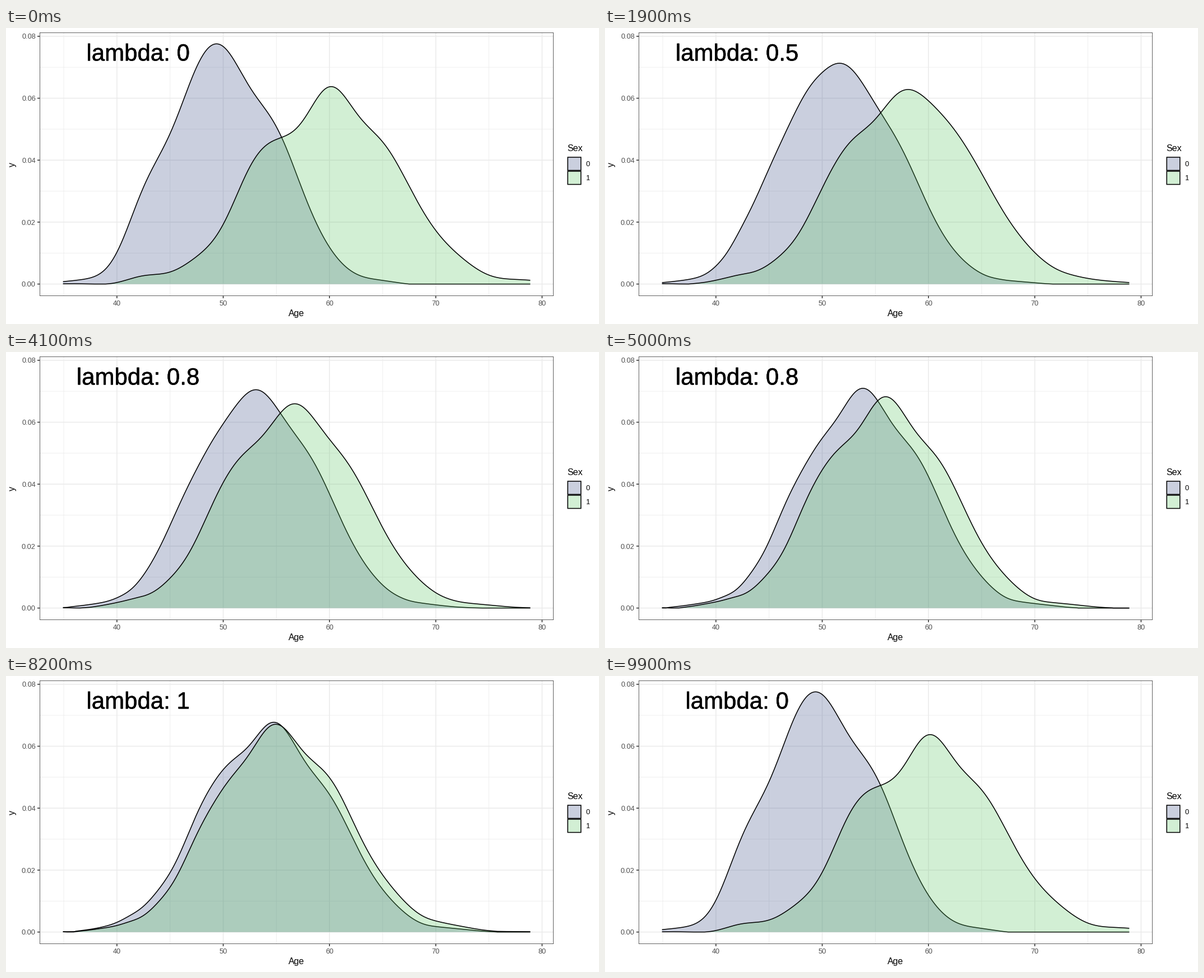
Write a matplotlib script that moves like this. It is 1058x529 px and loops after 10 s.

```python
import math

import matplotlib.pyplot as plt
import numpy as np
from matplotlib.animation import FuncAnimation
from matplotlib.patches import Polygon, Rectangle
from matplotlib.patheffects import withStroke

WIDTH, HEIGHT, DPI = 1058, 529, 64
PT = 72 / DPI  # points per pixel
LEFT, RIGHT, TOP, BOTTOM = 60, 977, 8, 479
BASE_SIZE, TICK_SIZE, LABEL_SIZE = 16, 12.8, 42
LINE = 1.55
FILLS = ["#3B4F88", "#5CC463"]
ALPHA = 0.27
AGE_TICKS, AGE_MIDDLES = range(40, 81, 10), range(35, 80, 10)
DENSITY_TICKS, DENSITY_MIDDLES = np.arange(5) * 0.02, np.arange(1, 8, 2) * 0.01

LAMBDAS = [0, 0.5, 0.8, 1]
REST, CYCLE = 5, 25  # first transition frame and frames per state
FRAMES = CYCLE * len(LAMBDAS)

# Heights (1e-4) of the two age densities, every 2.5 years from a first age.
STEP = 2.5
GROUPS = [
    (35, [8, 20, 103, 313, 486, 701, 767, 636, 508, 300, 119, 33, 12, 0]),
    (37.5, [0, 5, 27, 39, 89, 193, 378, 467, 528, 637, 554, 459, 316, 173,
            84, 29, 15, 9]),
]

plt.rcParams["font.family"] = "Liberation Sans"


def px_x(age):
    return 197.9 + (age - 40) * 18.963


def px_y(density):
    return 457.6 - density * 5535


def kernel_curve(first, heights, at):
    """Sum of Gaussian kernels that passes through the given heights."""
    knots = first + STEP * np.arange(len(heights))

    def kernels(ages):
        return np.exp(-0.5 * ((ages[:, None] - knots) / 1.9) ** 2)

    weights = np.linalg.solve(kernels(knots), np.array(heights) * 1e-4)
    return np.maximum(kernels(at) @ weights, 0) + 1e-7


def cumulative(density):
    total = np.cumsum(density)
    return (total - total[0]) / (total[-1] - total[0])


def repair(own, other, amount):
    """Move each quantile of one group towards the mean of both groups."""
    partner = np.interp(cumulative(own), cumulative(other), support)
    moved = support + amount / 2 * (partner - support)
    return np.interp(ages, moved, own / np.gradient(moved, support))


support = np.linspace(30, 84, 2001)
ages = np.linspace(34.927, 78.89, 441)
xs = px_x(ages)
first_group, second_group = (kernel_curve(*g, support) for g in GROUPS)
curves = np.array([[repair(first_group, second_group, amount),
                    repair(second_group, first_group, amount)]
                   for amount in LAMBDAS])

fig = plt.figure(figsize=(WIDTH / DPI, HEIGHT / DPI), dpi=DPI,
                 facecolor="white")
ax = fig.add_axes([0, 0, 1, 1])
ax.set_xlim(0, WIDTH)
ax.set_ylim(HEIGHT, 0)
ax.axis("off")


def line(x, y, color, width, zorder):
    return ax.plot(x, y, color=color, lw=width * PT, zorder=zorder,
                   solid_capstyle="butt", solid_joinstyle="round",
                   snap=False)[0]


def frame_box(x, y, w, h, color, width, zorder):
    ax.add_patch(Rectangle((x, y), w, h, fill=False, ec=color,
                           lw=width * PT, zorder=zorder, snap=False))


def text(x, y, string, size=TICK_SIZE, color="black", ha="center", **kw):
    return ax.text(x, y, string, fontsize=size * PT, color=color, ha=ha,
                   va="baseline", zorder=9, **kw)


def draw_grid():
    for width, columns, rows in ((LINE / 2, AGE_MIDDLES, DENSITY_MIDDLES),
                                 (LINE, AGE_TICKS, DENSITY_TICKS)):
        for age in columns:
            line([px_x(age)] * 2, [TOP, BOTTOM], "#EBEBEB", width, 1)
        for density in rows:
            line([LEFT, RIGHT], [px_y(density)] * 2, "#EBEBEB", width, 1)


def draw_axes():
    thin = LINE / 2
    frame_box(LEFT + thin / 2, TOP + thin / 2, RIGHT - LEFT - thin,
              BOTTOM - TOP - thin, "#333333", thin, 8)
    for age in AGE_TICKS:
        x = px_x(age)
        line([x, x], [BOTTOM, BOTTOM + 4], "#333333", LINE, 8)
        text(x, 495.8, str(age), color="#4D4D4D")
    for density in DENSITY_TICKS:
        y = px_y(density)
        line([LEFT - 4, LEFT], [y, y], "#333333", LINE, 8)
        text(52.8, y + 4.6, f"{density:.2f}", color="#4D4D4D", ha="right")
    text(518.3, 514.6, "Age", BASE_SIZE)
    text(16, 243.5, "y", BASE_SIZE, rotation=90, rotation_mode="anchor")


def draw_legend():
    text(1001, 220.5, "Sex", BASE_SIZE, ha="left")
    side = 23.5
    for i, fill in enumerate(FILLS):
        middle = 242.7 + 25.1 * i
        x, y = 1014 - side / 2, middle - side / 2
        ax.add_patch(Rectangle((x, y), side, side, fc=fill, alpha=ALPHA,
                               lw=0, zorder=3))
        frame_box(x, y, side, side, "black", LINE, 4)
        text(1034.5, middle + 4.7, str(i), ha="left")


draw_grid()
draw_axes()
draw_legend()

areas, outlines = [], []
for i, fill in enumerate(FILLS):
    areas.append(ax.add_patch(Polygon([(0, 0), (1, 0), (1, 1)], fc=fill,
                                      alpha=ALPHA, lw=0, zorder=3 + 2 * i)))
    outlines.append(line(xs, xs, "black", LINE, 4 + 2 * i))
label = text(235.7, 58.3, "", LABEL_SIZE)
label.set_path_effects([withStroke(linewidth=0.5 * PT, foreground="black")])


def progress(frame):
    """State index and share of the linear move to the next state."""
    state, step = divmod(frame, CYCLE)
    if state == 0:
        return state, max(0, (step - REST) / (CYCLE - REST))
    # Later states rest one frame longer and arrive on their last frame.
    begin, end = (REST + 1, CYCLE) if state == 1 else (REST, CYCLE - 1)
    return state, max(0, (step - begin) / (end - begin))


def update(frame):
    state, share = progress(frame)
    following = (state + 1) % len(LAMBDAS)
    blend = curves[state] * (1 - share) + curves[following] * share
    for area, outline, density in zip(areas, outlines, blend):
        ys = px_y(density)
        ends = [(xs[-1], px_y(0)), (xs[0], px_y(0))]
        area.set_xy(np.vstack([np.column_stack([xs, ys]), ends]))
        outline.set_ydata(ys)
    closest = following if share > 0.5 else state
    label.set_text(f"lambda: {LAMBDAS[closest]:g}")
    return [*areas, *outlines, label]


animation = FuncAnimation(fig, update, frames=FRAMES, interval=100,
                          repeat=True, repeat_delay=0)
plt.show()
```
